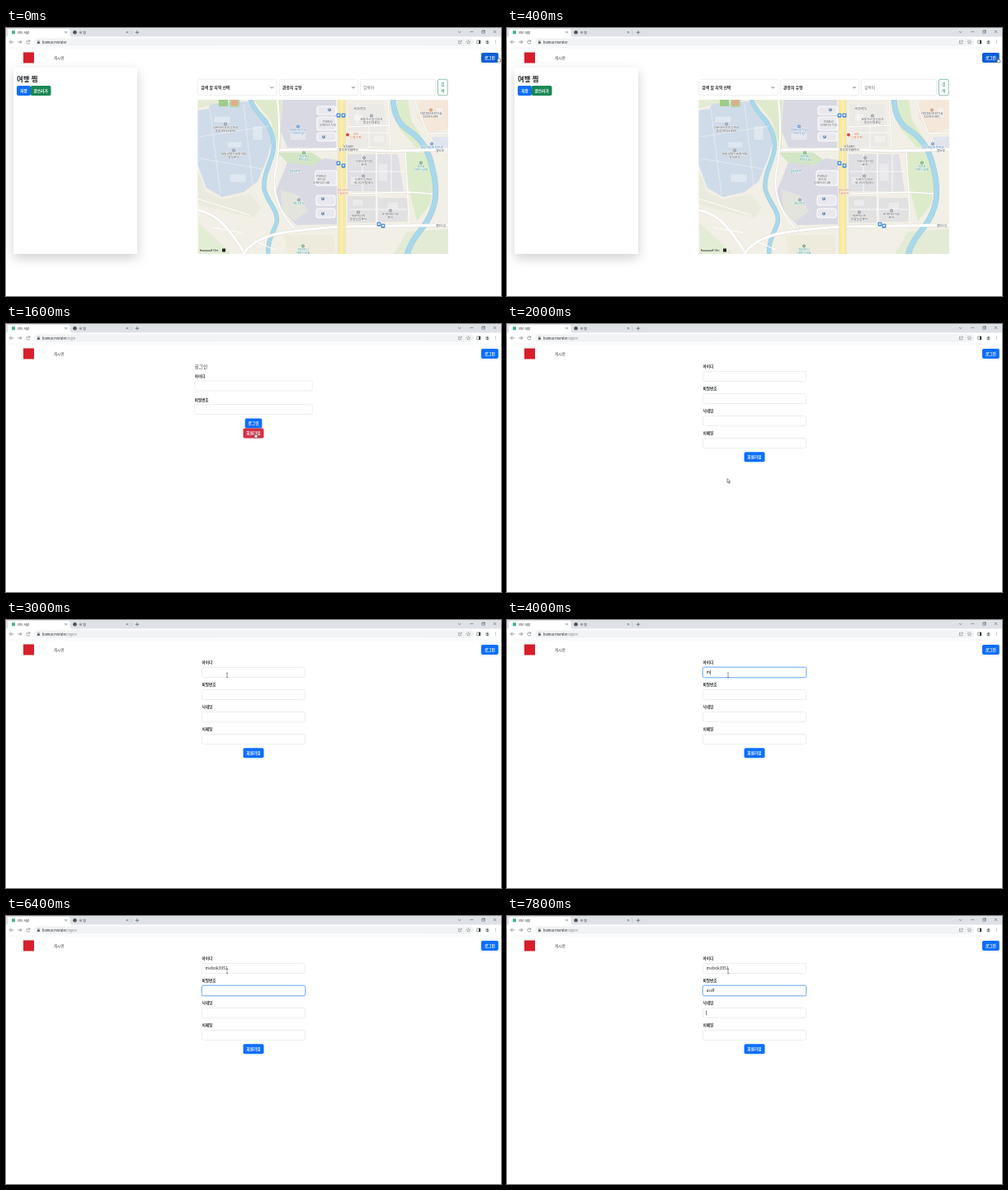
These frames come from a looping animation (600x325 px, 8 s). An HTML page:

```html
<!DOCTYPE html>
<html lang="ko">
<head>
<meta charset="utf-8">
<title>Vite App</title>
<style>
  html, body { margin: 0; width: 100%; height: 100%; overflow: hidden; background: #fff; }
  svg { display: block; width: 600px; height: 325px; }
  text { font-family: "Noto Sans CJK KR", "Noto Sans CJK", "Noto Sans", sans-serif; white-space: pre; }
</style>
</head>
<body>
<svg id="stage" viewBox="0 0 600 325" xmlns="http://www.w3.org/2000/svg">
  <defs>
    <filter id="lift" x="-30%" y="-30%" width="160%" height="160%">
      <feDropShadow dx="0" dy="5" stdDeviation="7" flood-color="#000" flood-opacity=".19"/>
    </filter>
    <clipPath id="mapBox"><rect x="232.5" y="87" width="303.5" height="187"/></clipPath>
  </defs>
</svg>
<script>
const NS = 'http://www.w3.org/2000/svg';
const stage = document.getElementById('stage');
const BLUE = '#0d6efd', BLUE_HOVER = '#0b5ed7', INK = '#212529', GREY = '#5f6368';

function el(parent, tag, attrs, text) {
  const node = document.createElementNS(NS, tag);
  for (const key in attrs) node.setAttribute(key, attrs[key]);
  if (text !== undefined) node.textContent = text;
  parent.appendChild(node);
  return node;
}
const group = (parent, attrs = {}) => el(parent, 'g', attrs);
const rect = (p, x, y, width, height, fill, rx = 0, more = {}) =>
  el(p, 'rect', { x, y, width, height, fill, rx, ...more });
const dot = (p, cx, cy, r, fill) => el(p, 'circle', { cx, cy, r, fill });
const shape = (p, d, fill) => el(p, 'path', { d, fill });
const line = (p, d, stroke, w = .6, more = {}) =>
  el(p, 'path', { d, fill: 'none', stroke, 'stroke-width': w, 'stroke-linejoin': 'round', ...more });
const label = (p, x, y, text, size = 4.7, fill = INK, weight = 400, anchor = 'start') =>
  el(p, 'text', { x, y, fill, 'font-size': size, 'font-weight': weight, 'text-anchor': anchor }, text);

function button(p, x, y, w, text, fill) {
  const box = rect(p, x, y, w, 12, fill, 1.9);
  label(p, x + w / 2, y + 7.7, text, 4.7, '#fff', 700, 'middle');
  return box;
}
function field(p, x, y, w, h = 12) {
  return rect(p, x, y, w, h, '#fff', 1.9, { stroke: '#ced4da', 'stroke-width': .4 });
}

// Browser frame
function drawBrowser(p) {
  rect(p, 0, 0, 600, 11, '#dee1e6');
  shape(p, 'M0 11Q2.500 11 2.500 8V3.500Q2.500 1 5 1H75Q77.500 1 77.500 3.500V8Q77.500 11 80 11Z', '#fff');
  rect(p, 0, 10.500, 600, 13.500, '#fff');
  rect(p, 7, 3.300, 4, 4, '#41b883');
  label(p, 13.700, 6.600, 'Vite App', 3.800, '#3c4043');
  dot(p, 83.500, 5.300, 2.300, '#4d5156');
  label(p, 88.500, 6.700, '새 탭', 3.900, '#3c4043');
  const cross = (x, y, r) => line(p, `M${x - r} ${y - r}l${2 * r} ${2 * r}m0 ${-2 * r}l${-2 * r} ${2 * r}`, '#3c4043', .5);
  cross(72.500, 5.200, 1.200);
  cross(147, 5.200, 1.200);
  cross(592.500, 4.500, 1.600);
  line(p, 'M152 3V8', '#9aa0a6', .4);
  line(p, 'M156.700 5.300h4.600m-2.300 -2.300v4.600', '#3c4043', .6);
  line(p, 'M548 4l1.700 1.700l1.700 -1.700M562.500 4.600h4', '#3c4043', .5);
  line(p, 'M576.800 3.600h2.800v2.800h-2.800zM577.600 3.600v-.8h2.800v2.800h-.8', '#3c4043', .45);

  line(p, 'M9 17H4.500M6.500 15l-2 2l2 2M14.300 17h4.500m-2 -2l2 2l-2 2', GREY, .65);
  line(p, 'M28.600 15.700A2.100 2.100 0 1 0 28.900 18M28.900 14.600v1.700h-1.700', GREY, .6);
  rect(p, 34, 12.200, 533, 9.600, '#f1f3f4', 4.800);
  rect(p, 37.900, 16.500, 3, 2.400, GREY, .3);
  line(p, 'M38.600 16.600v-.8a.8 .8 0 0 1 1.600 0v.8', GREY, .45);
  line(p, 'M550 15.500h-1.500v3.500h3.500v-1.200M550 17.500q.3-1.800 2.500-1.800m-1-1l1 1l-1 1', GREY, .45);
  line(p, 'M560.500 14.600l.7 1.600l1.700 .2l-1.300 1.100l.4 1.700l-1.500-.9l-1.500 .9l.4-1.700l-1.300-1.100l1.700-.2z', GREY, .4);
  rect(p, 570.800, 15, 4.200, 4, 'none', .4, { stroke: '#3c4043', 'stroke-width': .5 });
  rect(p, 573, 15, 2, 4, '#3c4043');
  dot(p, 583.500, 17, 2.600, '#d5dae1');
  dot(p, 583.500, 16.300, .9, '#3c4043');
  shape(p, 'M581.700 18.800q1.800-2.200 3.600 0z', '#3c4043');
  for (const y of [15.300, 17, 18.700]) dot(p, 593.500, y, .45, GREY);
  line(p, 'M0 24H600', '#e1e3e6', .4);
}

// Map
function drawMap(root) {
  const p = group(root, { 'clip-path': 'url(#mapBox)' });
  const road = (d, w = 2.500, fill = '#fff') => { line(p, d, '#dcd8d0', w + .7); line(p, d, fill, w); };
  rect(p, 232, 87, 305, 188, '#f2efe6');

  shape(p, 'M232 100L246 98L248 91L296 89L318 112L323 135L317 157L305 186L288 199L262 205L243 194L232 165Z', '#cfdbe8');
  shape(p, 'M232 87H290L252 92L232 98Z', '#e3ebd6');
  shape(p, 'M300 87H334L333 150L327 136L321 112Z', '#dfeacd');
  shape(p, 'M232 172L242 198L262 208L296 201L309 218L300 230L232 214Z', '#ebeade');
  shape(p, 'M335 87H400V145H341L333 125Z', '#d9d9e4');
  shape(p, 'M329 151H371L384 160L372 168L343 165Z', '#d2e5c4');
  shape(p, 'M341 163L372 167L386 158L401 160V238L352 239L334 220L327 198Z', '#d9d9e4');
  shape(p, 'M333 196L355 203L366 222L350 234L335 222Z', '#e3e5dc');
  shape(p, 'M414 153H475L482 198H414Z', '#dfdfe4');
  shape(p, 'M414 204H448V236H414ZM451 206H488L486 235H451Z', '#e2e1e2');
  shape(p, 'M415 92H458L463 144H415Z', '#eceae6');
  shape(p, 'M483 151H510L519 182L514 214L498 234L489 198Z', '#dcebca');
  shape(p, 'M474 87H487L491 112L512 145H497L475 120Z', '#dcebca');
  shape(p, 'M501 87H536V122L513 128L498 108Z', '#f5e7d9');
  shape(p, 'M516 132H536V146H520Z', '#e2e4ee');
  shape(p, 'M486 247L536 244V274H470Z', '#e3ebd6');
  shape(p, 'M337 251H398V274H341Z', '#efebdc');
  shape(p, 'M233 236L274 274H233Z', '#e3edd5');

  rect(p, 258, 86, 11, 9, '#9fcb88', 1);
  rect(p, 271, 86, 12, 10, '#b2d597', 2);
  rect(p, 273, 87, 8, 7, '#e0ad91', 1.500);

  const river = (d, w) => { line(p, d, '#8fc6dc', w + .8); line(p, d, '#a9d8ea', w); };
  river('M296 85C300 104 321 112 324 137C327 158 311 172 313 195C316 211 331 221 328 236C324 249 316 259 318 276', 4.500);
  river('M469 85C470 104 475 116 488 124C507 137 513 152 517 170C524 199 522 220 505 242C493 257 489 264 486 276', 6);

  road('M332 148L402 147L470 149L537 147', 3.200);
  road('M232 221C250 224 265 233 291 276', 3);
  road('M286 276C303 249 336 246 404 241L537 239', 3.200);
  road('M329 87C333 120 331 150 326 178C322 207 337 229 349 243', 2);
  road('M414 201L488 199L517 201M449 151V240M484 151L489 240', 1.500);
  road('M463 88L466 148M414 120L465 118M495 88L511 128L537 127', 1.300);
  line(p, 'M415 127h48M426 92v25M440 120v26M416 174h66M432 153v45M467 153v45M416 220h70', '#fff', .8);
  line(p, 'M234 132L318 119M247 98L260 202M288 92L299 192M234 158L311 171', '#e6edf3', .9);
  line(p, 'M301 258l25 11M232 207l64 20M250 242l36 6', '#fff', 1);
  road('M407 85V276', 8.500, '#f8e9a1');
  line(p, 'M407 87V274', '#fff8d9', .7);

  for (const [x, y, w, h] of [[377, 95, 23, 10], [377, 108, 23, 16], [377, 127, 23, 10], [375, 173, 26, 18], [376, 203, 23, 12], [376, 219, 23, 11]])
    rect(p, x, y, w, h, '#e8e8ee', 3, { stroke: '#fff', 'stroke-width': 1.100 });
  for (const [x, y, w, h] of [[252, 107, 20, 8], [268, 138, 18, 7], [299, 119, 12, 17], [271, 177, 20, 10], [344, 127, 20, 9], [421, 104, 12, 9], [445, 130, 14, 9], [417, 180, 11, 10], [451, 164, 12, 22], [420, 208, 13, 8], [462, 211, 14, 9], [521, 96, 9, 13]])
    rect(p, x, y, w, h, '#fff', .5, { opacity: .35, stroke: '#b9bdc8', 'stroke-width': .4 });

  // x, first baseline, lines, pin colour, text colour
  const DARK = '#4a4a4f', TEAL = '#2f8f86', SKY = '#3778b8', ORANGE = '#cc6a3a';
  const places = [
    [266, 122, ['다온바이오지식파크', '융합센터(2호관)'], '#8b93a0', DARK],
    [276, 154, ['새솔광물기술연구원', '동부본부'], '#8b93a0', DARK],
    [354, 125, ['스페이스누리', '어린이집'], '#5b8fd0', SKY],
    [390, 115, ['moruo', '스페이스누리'], '', DARK],
    [429, 99, ['HQN빌딩'], '', DARK],
    [443, 112, ['한빛가스점검공사', '동부지역본부'], '#8b93a0', DARK],
    [515, 105, ['가람첨단과학기술', '1단지아파트'], '#c58f62', DARK],
    [424, 130, ['새미', '더뜰카페'], '', ORANGE],
    [415, 145, ['N-basin', '동부지역협력단'], '', DARK],
    [434, 163, ['가온건설사업', '본사'], '#8b93a0', DARK],
    [433, 185, ['다온지식파크', '새나디지털센터'], '#8b93a0', DARK],
    [361, 157, ['첨단제1', '근린공원'], '#68a76f', TEAL],
    [503, 169, ['108호', '어린이공원'], '#68a76f', TEAL],
    [516, 146, ['공립새빛초등학교'], '#5b8fd0', SKY],
    [382, 181, ['moruo', '커머셜', '스페이스나래'], '', DARK],
    [408, 198, ['첨단과학', '기술단지'], '', ORANGE],
    [427, 229, ['새온에너지', '융합점검본사'], '#8b93a0', DARK],
    [466, 227, ['온새미바이오', '본사'], '#8b93a0', DARK],
    [350, 175, ['첨단연못'], '', TEAL],
    [355, 214, ['예나광장'], '#8b93a0', TEAL],
    [360, 270, ['첨단동산', '어린이공원'], '#68a76f', TEAL],
    [527, 241, ['첨단1길'], '', DARK],
    [526, 150, ['첨단로'], '', DARK],
  ];
  for (const [x, y, lines, pin, ink] of places) {
    if (pin) dot(p, x, y - 5.500, 1.900, pin), dot(p, x, y - 5.500, .7, '#fff');
    lines.forEach((s, i) => {
      const t = label(p, x, y + i * 4, s, 3.700, ink, 500, 'middle');
      t.setAttribute('stroke', '#fff');
      t.setAttribute('stroke-width', .7);
      t.setAttribute('paint-order', 'stroke');
    });
  }
  dot(p, 414, 129.500, 1.900, '#d24a3a');
  for (const [x, y] of [[392, 99], [385, 132], [384, 207], [384, 225]]) {
    dot(p, x, y, 2, '#6682a8');
    label(p, x, y + 1, 'P', 2.800, '#fff', 700, 'middle');
  }
  for (const [x, y] of [[403, 106], [409, 106], [403, 164], [409, 167], [452, 238], [457, 240]]) {
    rect(p, x - 2.400, y - 2.400, 4.800, 4.800, '#3f87df', .9);
    rect(p, x - 1.200, y - 1.300, 2.400, 2, '#fff', .3);
  }
  line(p, 'M235.500 268.500v1.500h14v-1.500', '#222', .8);
  label(p, 251, 271, '50m', 3.200, '#222', 500);
  rect(p, 262, 267.500, 4, 4, '#222');
}

// Pages
function drawHome(p) {
  rect(p, 9.500, 48, 149.500, 226, '#fff', 0, { filter: 'url(#lift)' });
  label(p, 13, 65, '여행 찜', 8.400, INK, 700);
  button(p, 13, 70, 17, '저장', BLUE);
  button(p, 29.700, 70, 24.800, '글쓰러가', '#198754');
  for (const [x, text] of [[232.500, '검색 할 지역 선택'], [331.300, '관광지 유형']]) {
    field(p, x, 62.300, 95.500, 19.500);
    label(p, x + 3.800, 73.800, text, 4.800, INK, 700);
    line(p, `M${x + 88} 71.300l1.800 1.800l1.800 -1.800`, '#343a40', .7);
  }
  field(p, 429.500, 62.300, 91, 19.500);
  label(p, 433, 73.700, '검색어', 4.700, '#6c757d');
  rect(p, 523.500, 62.300, 11.700, 19.500, '#fff', 1.900, { stroke: '#198754', 'stroke-width': .5 });
  label(p, 529.400, 70.300, '검', 4.700, '#198754', 500, 'middle');
  label(p, 529.400, 77.500, '색', 4.700, '#198754', 500, 'middle');
  drawMap(p);
}
function drawLogin(p) {
  label(p, 228.700, 54, '로그인', 5.600, INK, 500);
  label(p, 228.700, 64.900, '아이디', 4.600, INK, 700);
  field(p, 228.700, 69, 142.600);
  label(p, 228.700, 93.700, '비밀번호', 4.600, INK, 700);
  field(p, 228.700, 97.500, 142.600);
  button(p, 289.700, 114.500, 20.600, '로그인', BLUE);
  button(p, 287.500, 126.500, 25, '회원가입', '#d33045');
}

const ROWS = [57.500, 84.500, 111.500, 138.500];
function drawSignup(p) {
  ['아이디', '비밀번호', '닉네임', '이메일'].forEach((text, i) => {
    label(p, 237.500, ROWS[i] - 4.200, text, 4.600, INK, 700);
    field(p, 237.500, ROWS[i], 125);
  });
  const ring = group(p);
  rect(ring, 236.900, -.6, 126.200, 13.200, 'none', 2.500, { stroke: BLUE, 'stroke-opacity': .28, 'stroke-width': 1.250 });
  rect(ring, 237.500, 0, 125, 12, '#fff', 1.900, { stroke: '#76acfb', 'stroke-width': .7 });
  const inputs = ROWS.slice(0, 2).map(y => label(p, 241.500, y + 7.800, '', 5, INK, 500));
  const caret = rect(p, 0, 0, .5, 5.600, '#111');
  return { ring, inputs, caret, submit: button(p, 287.500, 155.200, 25, '회원가입', BLUE) };
}

function drawPointers() {
  const set = { arrow: group(stage), hand: group(stage), beam: group(stage) };
  const outline = { stroke: '#222', 'stroke-width': .5, 'stroke-linejoin': 'round', fill: '#fff' };
  el(set.arrow, 'path', { d: 'M0 0V5l1.200-1l.8 1.900l.9-.4l-.8-1.800h1.600z', ...outline });
  el(set.hand, 'path', { d: 'M-.5 .3q.5-.7 1 0v2l2 .5q.6 .2 .5 .9l-.4 2.300h-2.800l-1.700-2.300q.3-.8 1.400 0z', ...outline });
  line(set.beam, 'M-1 -2.800h2M0 -2.800v5.600M-1 2.800h2', '#333', .5);
  return set;
}

drawBrowser(stage);
const url = label(stage, 44, 18.600, '', 3.900, '#202124');
const path = el(url, 'tspan', {});
path.before('bulmar.monster');
path.setAttribute('fill', '#80868b');
rect(stage, 21, 29.500, 13, 13, '#d71f2b');
label(stage, 57.700, 37.700, '게시판', 4.700, '#444');
const navLogin = button(stage, 576, 30, 20.800, '로그인', BLUE);
const pages = { home: group(stage), login: group(stage), signup: group(stage) };
drawHome(pages.home);
drawLogin(pages.login);
const form = drawSignup(pages.signup);
const pointers = drawPointers();

const ID = 'mebok3951', PW = 'asdf';
const at = (kind, x, y) => ({ kind, x, y });
// Each step changes only the named values; caret and focus hold a row or -1.
const steps = [
  [0, { page: 'home', path: '', id: 0, pw: 0, caret: -1, focus: -1, hot: 'nav', ...at('hand', 596.7, 35) }],
  [200, at('hand', 595.8, 35.5)],
  [400, at('hand', 595, 36)],
  [800, { page: 'login', path: '/login', ...at('hand', 594, 38) }],
  [1000, { hot: '', ...at('arrow', 540, 66) }],
  [1200, at('arrow', 410, 108)],
  [1400, at('arrow', 322, 130)],
  [1600, at('hand', 302, 132)],
  [1800, { page: 'signup', hot: 'submit', ...at('hand', 295, 160) }],
  [2000, { path: '/signin', hot: '', ...at('arrow', 267, 187.5) }],
  [2200, at('arrow', 267, 178)],
  [2400, at('arrow', 267, 151)],
  [2600, at('arrow', 267.5, 120)],
  [2800, at('arrow', 268, 80)],
  [3000, at('beam', 268, 67)],
  [3200, { focus: 0, caret: 0 }],
  [3600, { caret: -1 }],
  [4000, { id: 1, caret: 0 }],
  [4200, { id: 4 }],
  [4400, { id: 7 }],
  [4600, { id: 9 }],
  [4800, { caret: 1 }],
  [5000, { focus: 1 }],
  [5400, { caret: -1 }],
  [5800, { caret: 1 }],
  [6400, { caret: -1 }],
  [6800, { pw: 1, caret: 1 }],
  [7000, { pw: 2 }],
  [7200, { pw: 3 }],
  [7400, { pw: 4 }],
  [7800, { caret: 2 }],
];

const show = (node, on) => node.setAttribute('display', on ? 'inline' : 'none');
function render(t) {
  const s = Object.assign({}, ...steps.filter(([from]) => from <= t).map(([, change]) => change));
  for (const name in pages) show(pages[name], name === s.page);
  for (const name in pointers) show(pointers[name], name === s.kind);
  pointers[s.kind].setAttribute('transform', `translate(${s.x} ${s.y})`);
  path.textContent = s.path;
  navLogin.setAttribute('fill', s.hot === 'nav' ? BLUE_HOVER : BLUE);
  form.submit.setAttribute('fill', s.hot === 'submit' ? BLUE_HOVER : BLUE);
  form.inputs[0].textContent = ID.slice(0, s.id);
  form.inputs[1].textContent = PW.slice(0, s.pw);
  show(form.ring, s.focus >= 0);
  if (s.focus >= 0) form.ring.setAttribute('transform', `translate(0 ${ROWS[s.focus]})`);
  show(form.caret, s.caret >= 0);
  if (s.caret >= 0) {
    const input = form.inputs[s.caret];
    const width = input && input.textContent ? input.getComputedTextLength() : 0;
    form.caret.setAttribute('x', 241.5 + width);
    form.caret.setAttribute('y', ROWS[s.caret] + 3.2);
  }
}

const start = performance.now();
let shown = -1;
function tick() {
  const t = (performance.now() - start) % 8000;
  const slot = Math.floor(t / 200);
  if (slot !== shown) render(t);
  shown = slot;
  requestAnimationFrame(tick);
}
tick();
</script>
</body>
</html>
```
